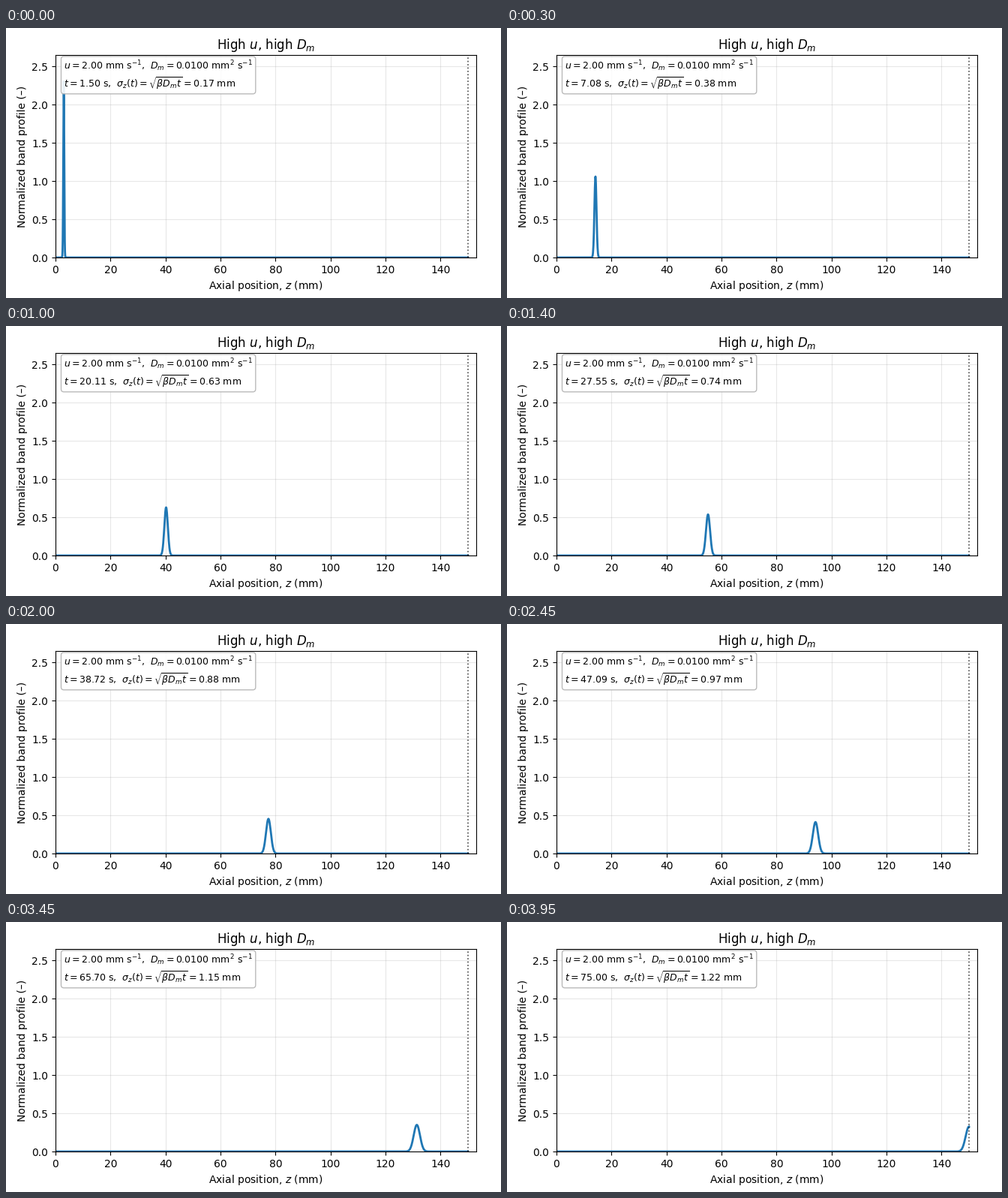
A matplotlib script for the animation above (4 s loop, 660 px wide and 360 px high).

```python
import numpy as np
import matplotlib.pyplot as plt
from matplotlib.animation import FuncAnimation

FRAMES, INTERVAL = 80, 50
LENGTH = 150.0          # column length, mm
U, D_M, BETA = 2.0, 0.01, 2.0
T_START, T_END = 1.5, LENGTH / U

z = np.linspace(0, LENGTH, 2000)
times = np.linspace(T_START, T_END, FRAMES)


def sigma(t):
    return np.sqrt(BETA * D_M * t)


def band(t):
    s = sigma(t)
    return np.exp(-0.5 * ((z - U * t) / s) ** 2) / (s * np.sqrt(2 * np.pi))


def caption(t):
    return (rf"$u={U:.2f}$ mm s$^{{-1}}$,  $D_m={D_M:.4f}$ mm$^2$ s$^{{-1}}$"
            "\n"
            rf"$t={t:.2f}$ s,  $\sigma_z(t)=\sqrt{{\beta D_m t}}={sigma(t):.2f}$ mm")


fig, ax = plt.subplots(figsize=(6.6, 3.6), dpi=100)
fig.subplots_adjust(left=0.1, right=0.95, bottom=0.15, top=0.9)

ax.set_xlim(0, 1.02 * LENGTH)
ax.set_ylim(0, 1.15 * band(T_START).max())
ax.set_xlabel("Axial position, $z$ (mm)")
ax.set_ylabel("Normalized band profile (–)")
ax.set_title("High $u$, high $D_m$")
ax.grid(True, alpha=0.3)

line, = ax.plot([], [], lw=2)
ax.axvline(LENGTH, color="k", ls=":", lw=1.2, alpha=0.7)
label = ax.text(0.02, 0.98, "", transform=ax.transAxes, va="top", ha="left", fontsize=9,
                bbox=dict(boxstyle="round,pad=0.3", facecolor="white",
                          edgecolor="0.7", alpha=0.9))


def update(i):
    t = times[i]
    line.set_data(z, band(t))
    label.set_text(caption(t))
    return line, label


anim = FuncAnimation(fig, update, frames=FRAMES, interval=INTERVAL,
                     repeat=True, repeat_delay=0, blit=False)
plt.show()
```
